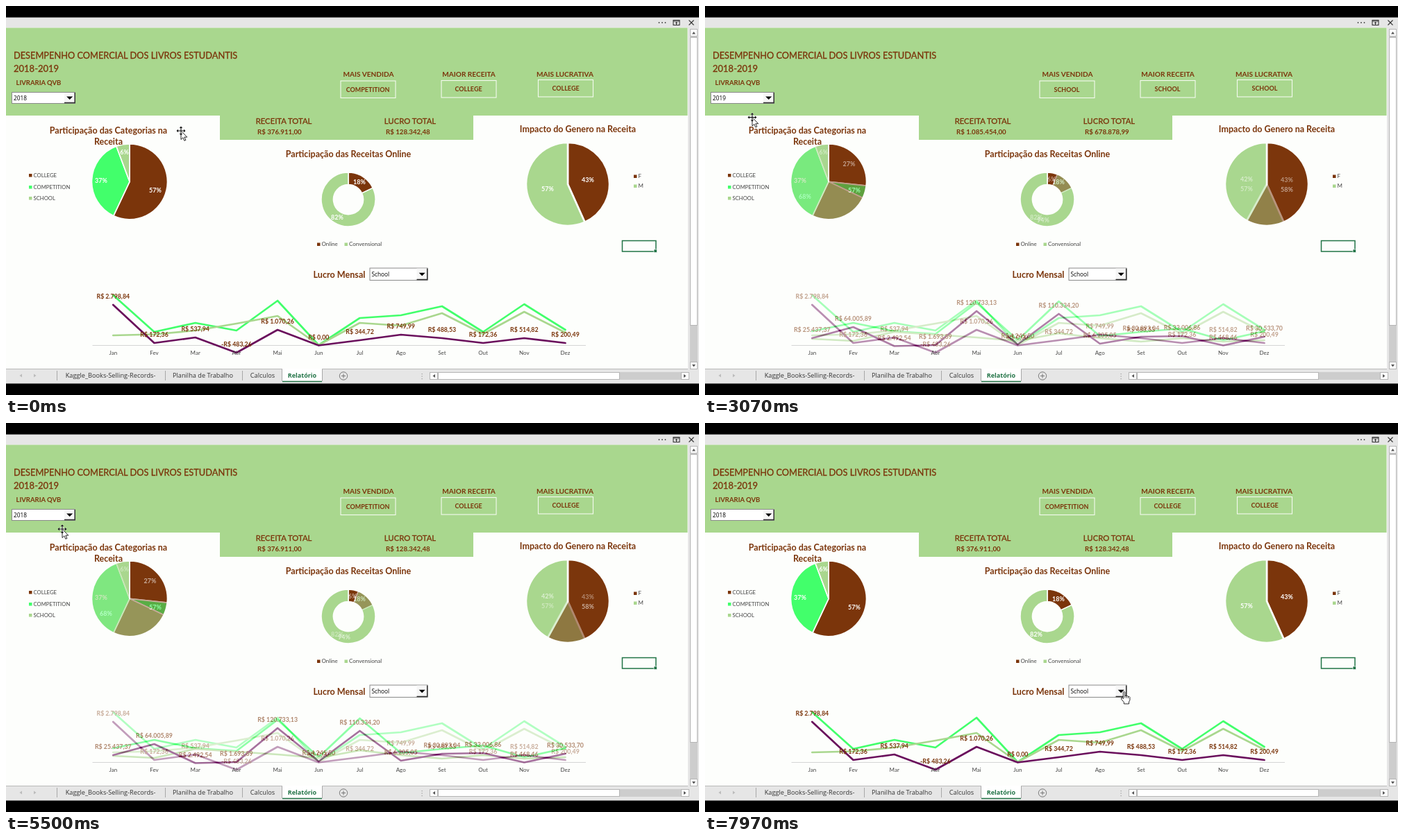
An HTML page for the animation above (8 s loop, 998 px wide and 561 px high).

```html
<!DOCTYPE html>
<html lang="pt">
<head>
<meta charset="utf-8">
<title>Desempenho comercial</title>
<style>
html, body { margin: 0; width: 100%; height: 100%; overflow: hidden; background: #000; }
svg { display: block; width: 998px; height: 561px; }
text { font-family: Lato, sans-serif; white-space: pre; }
.ui { font-family: "Open Sans", sans-serif; }
.b { font-weight: 700; }
.m { stroke: #7b350b; stroke-width: 0.3px; }
.charts { isolation: isolate; }
.charts > g { mix-blend-mode: plus-lighter; }
</style>
</head>
<body>
<svg id="stage" viewBox="0 0 998 561" xmlns="http://www.w3.org/2000/svg"></svg>
<script>
const LOOP = 8000;
const BROWN = '#7b350b', LIGHT = '#a9d78e', BRIGHT = '#42ff6b', PURPLE = '#6a0f5c', GREY = '#444';
const stage = document.getElementById('stage');

function el(parent, tag, attrs = {}) {
  const node = document.createElementNS('http://www.w3.org/2000/svg', tag);
  for (const k in attrs) node.setAttribute(k, attrs[k]);
  parent.append(node);
  return node;
}
const group = (parent, attrs) => el(parent, 'g', attrs);
const rect = (parent, x, y, width, height, fill, more) =>
  el(parent, 'rect', { x, y, width, height, fill, ...more });
const path = (parent, d, fill, more) => el(parent, 'path', { d, fill, ...more });
const line = (parent, d, stroke, width = 1) =>
  path(parent, d, 'none', { stroke, 'stroke-width': width });

// y is the middle of the capital letters
function text(parent, str, x, y, size, fill, cls = '', anchor = 'middle') {
  const node = el(parent, 'text', {
    x, y: y + size * 0.36, 'font-size': size, fill, class: cls, 'text-anchor': anchor
  });
  node.textContent = str;
  return node;
}

function drawWindow() {
  rect(stage, 0, 0, 998, 561, '#000');
  rect(stage, 0, 16.5, 998, 528, '#e6e6e6');
  rect(stage, 0, 31.5, 982, 491.5, '#fdfefc');
  rect(stage, 0, 31.5, 981.5, 126.5, LIGHT);
  rect(stage, 308, 157, 365, 36, LIGHT);

  for (const x of [940.5, 945, 949.5]) el(stage, 'circle', { cx: x, cy: 24, r: 0.9, fill: '#444' });
  rect(stage, 961, 20.5, 9, 7, 'none', { stroke: '#333', 'stroke-width': 1.1 });
  line(stage, 'M961 22h9M965.5 27v-4M963.8 25l1.7-1.7 1.7 1.7', '#333');
  line(stage, 'M983.5 20.5l7 7M990.5 20.5l-7 7', '#333', 1.1);

  // scroll bars
  const box = { stroke: '#b5b5b5', 'stroke-width': 1 };
  rect(stage, 985, 44, 11, 469, '#cdcdcd');
  rect(stage, 622, 528, 350, 11, '#cdcdcd');
  for (const y of [33.5, 513.5]) rect(stage, 985.5, y, 10, 10, '#fff', box);
  rect(stage, 985.5, 45.5, 10, 415, '#fff', box);
  path(stage, 'M988 40.5h5l-2.5-3.5zM988 517h5l-2.5 3.5z', '#555');
  for (const x of [610.5, 972.5]) rect(stage, x, 528.5, 11, 10, '#fff', box);
  rect(stage, 622.5, 528.5, 261, 10, '#fff', box);
  path(stage, 'M618 531v5l-3.5-2.5zM976 531v5l3.5-2.5z', '#555');

  // sheet tabs
  line(stage, 'M0 523.5H982', '#b9b9b9');
  rect(stage, 398, 523, 57, 19, '#fff');
  line(stage, 'M398 541.5H455', '#217346', 1.5);
  line(stage, 'M73.5 526v14M229.5 526v14M340.5 526v14M397.5 524v17M455.5 524v17', '#a8a8a8');
  path(stage, 'M23 530.5v5l-3.5-2.5zM40 530.5v5l3.5-2.5z', '#bbb');
  const tab = (s, x) => text(stage, s, x, 533, 9.2, '#333', 'ui');
  tab('Kaggle_Books-Selling-Records-', 150.5);
  tab('Planilha de Trabalho', 283.5);
  tab('Calculos', 369.5);
  text(stage, 'Relatório', 426.5, 533, 9, '#217346', 'ui b');
  el(stage, 'circle', { cx: 486, cy: 533.5, r: 5.7, fill: 'none', stroke: '#777' });
  line(stage, 'M483 533.5h6M486 530.5v6', '#777');
  for (const y of [530, 533.5, 537]) rect(stage, 598.5, y, 1.2, 1.2, '#999');
}

function combo(x, y, w, h, str) {
  rect(stage, x + 0.5, y + 0.5, w - 1, h - 1, '#fff', { stroke: '#8a8a8a' });
  const bx = x + w - 16;
  rect(stage, bx, y + 1, 15, h - 2, '#f6f6f6');
  line(stage, `M${bx} ${y + h - 1.5}H${x + w - 0.8}V${y + 1}`, '#333', 1.5);
  path(stage, `M${bx + 3.2} ${y + h / 2 - 2}h9l-4.5 4.5z`, '#000');
  return text(stage, str, x + 3, y + h / 2 + 0.4, 8.3, '#000', 'ui', 'start');
}

function legend(items, size = 8) {
  for (const [str, x, y, color] of items) {
    rect(stage, x, y - 2, 4.5, 4.5, color);
    text(stage, str, x + 6.5, y, size, GREY, '', 'start');
  }
}

function drawReport() {
  text(stage, 'DESEMPENHO COMERCIAL DOS LIVROS ESTUDANTIS', 11, 71.3, 12.8, BROWN, 'm', 'start');
  text(stage, '2018-2019', 11, 90.5, 13, BROWN, 'm', 'start');
  text(stage, 'LIVRARIA QVB', 14.5, 110.5, 9.5, BROWN, 'b', 'start');
  text(stage, 'MAIS VENDIDA', 522, 98, 10.1, BROWN, 'b');
  text(stage, 'MAIOR RECEITA', 666.5, 98, 10.1, BROWN, 'b');
  text(stage, 'MAIS LUCRATIVA', 805, 98, 10.1, BROWN, 'b');
  for (const [x, y] of [[482, 108], [627, 107.5], [766.5, 106.5]])
    rect(stage, x, y, 79, 24.5, 'none', { stroke: '#f4faef', 'stroke-width': 1.1 });
  text(stage, 'RECEITA TOTAL', 400, 165.5, 11.3, BROWN, 'm');
  text(stage, 'LUCRO TOTAL', 582, 165.5, 11.3, BROWN, 'm');

  text(stage, 'Impacto do Genero na Receita', 823.5, 177.5, 12.5, BROWN, 'b');
  text(stage, 'Participação das Receitas Online', 493, 213, 12.5, BROWN, 'b');
  text(stage, 'Lucro Mensal', 480, 387, 12.6, BROWN, 'b');
  legend([['COLLEGE', 33, 244, BROWN], ['COMPETITION', 33, 261, BRIGHT], ['SCHOOL', 33, 277, LIGHT]], 7.7);
  legend([['Online', 448, 343.5, BROWN], ['Convensional', 487.5, 343.5, LIGHT],
    ['F', 904, 245.5, BROWN], ['M', 904, 259.5, LIGHT]]);

  rect(stage, 887.5, 338.5, 48.5, 15.5, 'none', { stroke: '#217346', 'stroke-width': 1.5 });
  rect(stage, 933, 351, 4.5, 4.5, '#217346', { stroke: '#fff', 'stroke-width': 0.7 });

  line(stage, 'M124.5 489.5H835', '#d5d5d5');
}

const monthX = i => 154.3 + 59.2 * i;

const YEARS = {
  2018: {
    best: ['COMPETITION', 'COLLEGE', 'COLLEGE'], totals: ['R$ 376.911,00', 'R$ 128.342,48'],
    cat: [0.57, 0.943], online: 0.18, gender: 0.433,
    tags: [['57%', 215, 266], ['37%', 137, 252], ['6%', 170.5, 211], ['18%', 509, 254],
      ['82%', 477, 304.5], ['43%', 838, 251], ['57%', 780, 264]],
    lines: [
      [417, 470, 457, 468, 425, 489, 450, 446, 433, 470, 430, 467],
      [475, 473.5, 468, 458, 447, 489, 457, 461, 443, 473, 441, 471],
      [431, 486, 478, 500, 467, 489.5, 482, 474, 479, 486, 479, 486]],
    money: '2.798,84 172,36 537,94 -483,26 1.070,26 0,00 344,72 749,99 488,53 172,36 514,82 200,49'
  },
  2019: {
    best: ['SCHOOL', 'SCHOOL', 'SCHOOL'], totals: ['R$ 1.085.454,00', 'R$ 678.878,99'],
    cat: [0.267, 0.321], online: 0.06, gender: 0.58,
    tags: [['27%', 207.5, 228], ['68%', 144, 275], ['6%', 499, 249.5], ['94%', 487, 309],
      ['58%', 838, 265], ['42%', 780, 249.5]],
    lines: [
      [469, 457, 469, 473, 428, 482, 426, 476, 470, 465, 482, 469],
      [480, 483, 470, 474, 478, 483, 472, 479, 484, 479, 484, 482],
      [479, 463, 490.5, 489, 440, 488, 444, 487, 477, 476, 489.5, 477]],
    money: '25.437,37 64.005,89 2.492,54 1.693,89 120.733,13 4.245,50 110.334,20 6.205,05 30.893,04 33.006,86 468,46 30.533,70'
  }
};

// Slices run clockwise from the top; r0 is the hole
function pie(parent, cx, cy, r, r0, cuts, colors, gap) {
  const at = (f, d) => {
    const a = f * 2 * Math.PI;
    return `${(cx + d * Math.sin(a)).toFixed(2)} ${(cy - d * Math.cos(a)).toFixed(2)}`;
  };
  const ends = [0, ...cuts, 1];
  colors.forEach((c, i) => {
    const a = ends[i], b = ends[i + 1], big = b - a > 0.5 ? 1 : 0;
    const inner = r0 ? `L${at(b, r0)}A${r0} ${r0} 0 ${big} 0 ${at(a, r0)}` : `L${cx} ${cy}`;
    path(parent, `M${at(a, r)}A${r} ${r} 0 ${big} 1 ${at(b, r)}${inner}Z`, c,
      { stroke: '#fdfefc', 'stroke-width': gap, 'stroke-linejoin': 'round' });
  });
}

function drawYear(parent, y) {
  const g = group(parent);
  pie(g, 178, 253.3, 54.5, 0, y.cat, [BROWN, BRIGHT, LIGHT], 1.7);
  pie(g, 493, 279, 39, 21.5, [y.online], [BROWN, LIGHT], 1.6);
  pie(g, 809, 257, 60, 0, [y.gender], [BROWN, LIGHT], 2.6);
  for (const [s, tx, ty] of y.tags) text(g, s, tx, ty, 9, '#fff', 'b');
  y.lines.forEach((ys, k) => el(g, 'polyline', {
    points: ys.map((v, i) => `${monthX(i)},${v}`).join(' '), fill: 'none',
    stroke: [BRIGHT, LIGHT, PURPLE][k], 'stroke-width': 2.7,
    'stroke-linejoin': 'round', 'stroke-linecap': 'round'
  }));
  y.money.split(' ').forEach((m, i) => {
    const s = m[0] === '-' ? '-R$ ' + m.slice(1) : 'R$ ' + m;
    text(g, s, monthX(i), y.lines[2][i] - 11.8, 8.8, BROWN, 'b');
  });
  return g;
}

function drawList() {
  const g = group(stage);
  rect(g, 8.5, 141.5, 91, 25, '#fff', { stroke: '#555' });
  const bar = rect(g, 9, 142, 90, 12, '#0078d7');
  const items = ['2018', '2019'].map((s, i) => text(g, s, 11, 148.3 + 12 * i, 8.3, '#000', 'ui', 'start'));
  return { g, bar, items };
}

function drawCursors() {
  const ink = { stroke: '#111', 'stroke-width': 0.9, 'stroke-linejoin': 'round' };
  const arrow = 'M0 0V12.5L2.9 9.8L4.9 14.3L6.9 13.4L4.9 9.1H8.8Z';
  const plain = group(stage), move = group(stage), hand = group(stage);
  path(plain, arrow, '#fff', ink);
  path(move, arrow, '#fff', ink);
  line(move, 'M-6 0H6M0-6V6', '#fff', 2.6);
  line(move, 'M-5 0H5M0-5V5', '#111', 1.1);
  path(move, 'M-6.5 0l2.5-2.2v4.4zM6.5 0l-2.5-2.2v4.4zM0-6.5l-2.2 2.5h4.4zM0 6.5l-2.2-2.5h4.4z', '#111');
  path(hand, 'M-1.2 1Q0-.8 1.2 1V6.5Q2.6 5.4 3.6 6.9Q5 6 6 7.4Q7.8 6.9 8.4 8.6V12.5L7 15.2V18H-.2V15.6L-4 11.2Q-4.6 8.8-2.8 9.2L-1.2 10.8Z', '#fff', ink);
  line(hand, 'M1.2 6.5V9.5M3.6 7V9.8M6 7.5V10', '#111', 0.8);
  return { plain, move, hand };
}

drawWindow();
drawReport();
const yearText = combo(8, 124, 92, 17, '2018');
combo(523.5, 377.5, 84, 18.5, 'School');
const charts = group(stage, { class: 'charts' });
const layers = { 2018: drawYear(charts, YEARS[2018]), 2019: drawYear(charts, YEARS[2019]) };
text(stage, 'Participação das Categorias na', 147.5, 179, 12.5, BROWN, 'b');
text(stage, 'Receita', 147.5, 195.8, 12.5, BROWN, 'b');
'Jan Fev Mar Abr Mai Jun Jul Ago Set Out Nov Dez'.split(' ')
  .forEach((m, i) => text(stage, m, monthX(i), 500.5, 8, GREY));
const best = [[521, 120.3], [666, 119.5], [806, 119]].map(([x, y]) => text(stage, '', x, y, 9, BROWN, 'b'));
const totals = [362, 547].map(x => text(stage, '', x, 182, 9.7, BROWN, 'b', 'start'));
const list = drawList();
const cursors = drawCursors();

// time, x, y, shape from this time on
const TRACK = [
  [0, 252, 180, 'move'], [30, 252, 180, 'move'], [170, 238, 175, 'move'], [1200, 238, 175, 'move'],
  [1300, 170, 155, 'move'], [1600, 170, 155, 'move'], [1730, 91, 132, 'plain'], [2230, 91, 132, 'plain'],
  [2530, 80, 147, 'plain'], [2770, 80, 147, 'plain'], [2890, 68, 160, 'move'], [3200, 68, 161, 'move'],
  [3600, 68, 161, 'move'], [3900, 75, 152, 'move'], [4370, 75, 152, 'move'], [4570, 91, 132, 'plain'],
  [4850, 91, 132, 'plain'], [5000, 82, 148, 'plain'], [5240, 82, 148, 'plain'], [5330, 81, 153, 'move'],
  [5930, 81, 153, 'move'], [6230, 150, 176, 'move'], [6470, 150, 176, 'move'], [6570, 188, 190, 'move'],
  [6930, 188, 190, 'move'], [7730, 594, 382, 'hand'], [7770, 594, 382, 'hand'], [7940, 603.5, 387, 'hand'],
  [LOOP, 603.5, 387, 'hand']
];
const OPEN = [[2260, 2880], [4880, 5280]];
const ramp = (t, a, b) => Math.min(1, Math.max(0, (t - a) / (b - a)));
const show = (node, on) => node.setAttribute('visibility', on ? 'visible' : 'hidden');

function cursorAt(t) {
  const i = TRACK.findIndex(k => k[0] > t) - 1;
  const [t0, x0, y0, shape] = TRACK[i], [t1, x1, y1] = TRACK[i + 1];
  const p = ramp(t, t0, t1), e = p * p * (3 - 2 * p);
  return { x: x0 + (x1 - x0) * e, y: y0 + (y1 - y0) * e, shape };
}

function draw(now) {
  const t = now % LOOP;
  const year = t >= 2880 && t < 5280 ? 2019 : 2018;
  const mix = ramp(t, 2900, 3220) - ramp(t, 5370, 5690);
  layers[2018].setAttribute('opacity', 1 - mix);
  layers[2019].setAttribute('opacity', mix);

  yearText.textContent = year;
  best.forEach((n, i) => { n.textContent = YEARS[year].best[i]; });
  totals.forEach((n, i) => { n.textContent = YEARS[year].totals[i]; });

  const c = cursorAt(t);
  for (const k in cursors) show(cursors[k], k === c.shape);
  cursors[c.shape].setAttribute('transform', `translate(${c.x.toFixed(2)} ${c.y.toFixed(2)})`);

  show(list.g, OPEN.some(([a, b]) => t >= a && t < b));
  const hover = c.y < 142 ? year - 2018 : c.y > 154 ? 1 : 0;
  list.bar.setAttribute('y', 142 + 12 * hover);
  list.items.forEach((n, i) => n.setAttribute('fill', i === hover ? '#fff' : '#000'));
}

function tick() {
  draw(performance.now());
  requestAnimationFrame(tick);
}
tick();
</script>
</body>
</html>
```
